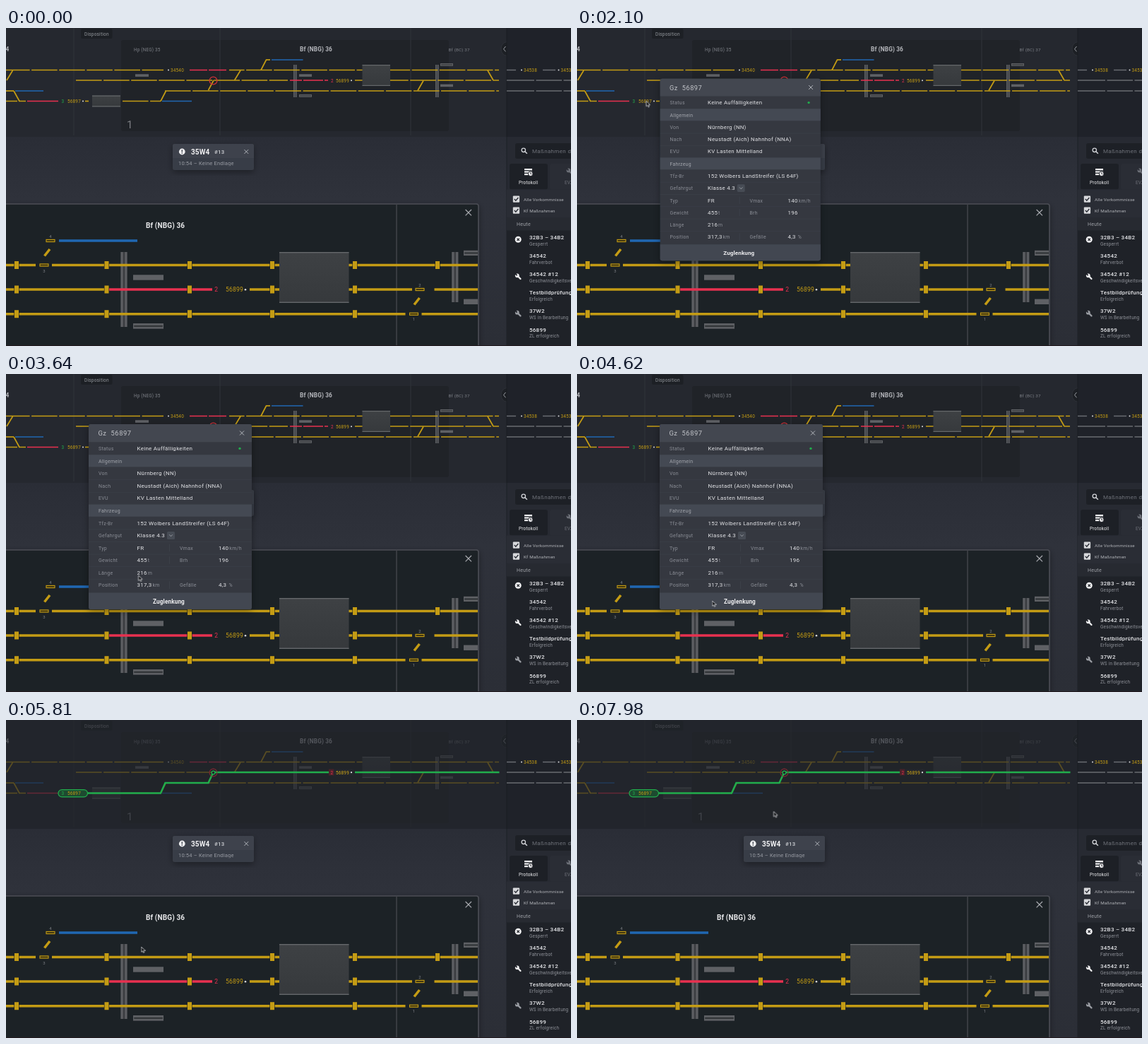
An HTML page for the animation above (8 s loop, 800 by 450 pixels).

```html
<!DOCTYPE html>
<html lang="de">
<head>
<meta charset="utf-8">
<title>Disposition</title>
<style>
html, body { margin: 0; width: 100%; height: 100%; overflow: hidden; background: #2c2f38; }
svg { display: block; width: 100vw; height: 100vh; }
text { font-family: Roboto, "Noto Sans", sans-serif; letter-spacing: .2px; white-space: pre; }
.b { font-weight: 700; letter-spacing: .13px; }
.m { font-weight: 500; letter-spacing: .25px; }
.w { letter-spacing: .35px; }
.v { letter-spacing: .27px; }
#popup { transform-origin: 160px 115px; animation: popup 8s infinite; }
#route { animation: route 8s infinite linear; }
#cursor { animation: cursor 8s infinite ease-in-out; }
@keyframes popup {
  0%, 24% { opacity: 0; transform: scale(.92); animation-timing-function: ease-out; }
  25.5% { opacity: 1; transform: scale(.974); animation-timing-function: linear; }
  26.25% { opacity: 1; transform: scale(.983); animation-timing-function: ease-out; }
  29%, 61.5% { opacity: 1; transform: scale(1); animation-timing-function: ease-in; }
  64%, 100% { opacity: 0; transform: scale(.95); }
}
@keyframes route {
  0%, 67.5% { opacity: 0; }
  71%, 100% { opacity: 1; }
}
@keyframes cursor {
  0%, 7% { transform: translate(210px, 462px); }
  15.6%, 20% { transform: translate(98px, 95px); }
  23%, 33% { transform: translate(98px, 103.5px); animation-timing-function: ease-in; }
  45.5% { transform: translate(187.5px, 285px); animation-timing-function: ease-out; }
  53%, 85.5% { transform: translate(191.5px, 321px); }
  95%, 100% { transform: translate(278.5px, 129.5px); }
}
</style>
</head>
<body>
<svg id="stage" viewBox="0 0 800 450" preserveAspectRatio="none"></svg>
<script>
const YELLOW = '#c49c14', RED = '#e8304f', BLUE = '#2067b2', GREEN = '#21ad4c';
const GREY = '#5f6165', DARK = '#1f2226', PALE = '#dcdde0', MUTED = '#8a8d95';

const rect = (x, y, w, h, fill, more = '') =>
  `<rect x="${x}" y="${y}" width="${w}" height="${h}" fill="${fill}" ${more}/>`;
const path = (d, stroke, width = 1.7, more = '') =>
  `<path d="${d}" fill="none" stroke="${stroke}" stroke-width="${width}" ${more}/>`;
const line = (x1, x2, y, stroke, width, more) => path(`M${x1} ${y}H${x2}`, stroke, width, more);
const text = (x, y, size, fill, str, cls = '', more = '') =>
  `<text x="${x}" y="${y}" font-size="${size}" fill="${fill}" class="${cls}" ${more}>${str}</text>`;
const dot = (x, y, r, fill, more = '') => `<circle cx="${x}" cy="${y}" r="${r}" fill="${fill}" ${more}/>`;
const cross = (x, y, r, stroke, width = 1.2) =>
  path(`M${x - r} ${y - r}l${2 * r} ${2 * r}m0 ${-2 * r}l${-2 * r} ${2 * r}`, stroke, width);
const group = (id, body) => `<g id="${id}">${body}</g>`;
const MID = 'text-anchor="middle"';

const defs = `<defs>
  <linearGradient id="area" x2="0" y2="1"><stop stop-color="#2a2d36"/><stop offset=".3" stop-color="#2f323b"/><stop offset="1" stop-color="#2b2e36"/></linearGradient>
  <linearGradient id="hall" x2="0" y2="1"><stop stop-color="#3e4144"/><stop offset="1" stop-color="#36393c"/></linearGradient>
  <filter id="shade" x="-20%" y="-20%" width="140%" height="140%"><feDropShadow dx="0" dy="3" stdDeviation="5" flood-opacity=".35"/></filter>
  <clipPath id="note"><rect x="236" y="183" width="115" height="12.3"/></clipPath>
  <clipPath id="pane"><rect x="0" y="250" width="668" height="200"/></clipPath>
</defs>`;

// two parallel upright beams
const beams = (x, y, w, h) =>
  rect(x, y, w, h, '#3a3c40') + rect(x, y, w * .36, h, '#5c5e62') + rect(x + w * .64, y, w * .36, h, '#5c5e62');
const hall = (x, y, w, h, edge) =>
  rect(x, y, w, h, 'url(#hall)') + rect(x, y, w, edge, '#65686b') + rect(x, y + h - edge, w, edge, '#65686b');
// hollow platform
const ledge = (x, y, w, h, e) => rect(x, y, w, h, GREY) + rect(x + e, y + h * .35, w - 2 * e, h * .32, '#34373a');

function strip() {
  const track = (x1, x2, y, shift = 0) =>
    line(x1, x2, y, YELLOW, 1.7, `stroke-dasharray="36.6 2.5" stroke-dashoffset="${shift}"`);
  const diag = d => path(d, YELLOW, 1.7);
  let s = rect(0, 0, 709, 154, '#25282f') + rect(163, 17, 464, 129, '#202328', 'rx="3"');
  for (const x of [96, 303, 573]) s += rect(x - .5, 0, 1, 152, '#31343b');
  s += rect(106, 1, 44.5, 14, '#1d2025', 'rx="2"') + text(111, 11, 6.5, '#94979d', 'Disposition');
  s += text(-.5, 33, 8.3, '#b4b6bb', '4', 'b') + text(181, 32.5, 6.4, '#7d8087', 'Hp (NEG) 35') +
    text(416, 33, 8.3, '#b4b6bb', 'Bf (NBG) 36', 'b') + text(626.5, 32.5, 6.2, '#7d8087', 'Bf (BC) 37');
  s += text(171, 142, 15, '#7c7e83', '1');

  s += rect(183, 65.3, 19, 3.6, GREY) + rect(415, 65.3, 18, 3.6, GREY) + ledge(415, 94, 18, 3.8, 1) +
    beams(407, 52, 4.6, 46) + beams(608, 52, 4.6, 46) + ledge(615, 50, 18, 3.8, 1) + rect(615, 79.6, 18, 3.6, GREY);

  s += track(0, 223, 59.5, 3) + line(260, 312, 59.5, RED, 1.7, 'stroke-dasharray="25 2"') + track(316, 698, 59.5, 15);
  s += track(99, 399, 74) + line(402, 456, 74, RED, 1.7, 'stroke-dasharray="17 2 28 2"') + track(494, 698, 74);
  s += line(0, 11, 89, YELLOW) + line(13, 53, 89, BLUE) + track(225, 698, 89);
  s += line(0, 28, 103.5, YELLOW, 1.7, 'stroke-dasharray="16 2"') + line(30, 74, 103.5, RED) +
    line(112, 117, 103.5, YELLOW) + track(165, 219, 103.5) + line(221, 263, 103.5, BLUE);
  s += line(368, 374, 45, YELLOW) + line(376, 420.5, 45, BLUE);
  s += diag('M1 74L9.5 60M11 89L19 103.5M219 103.5L226.5 89M286.5 88L294 74M323.5 74L332 60M361 59.5L368.5 45M583 88.5L591 74.5M682 60L690 74');
  s += hall(122, 95.5, 40, 16, 1.2) + hall(504.5, 52, 39.5, 30, 1.2);
  s += dot(293.5, 74.5, 5.4, 'none', `stroke="#cf3039" stroke-width="1.3"`);

  s += dot(230, 59.5, 1, PALE) + text(233, 62, 6.4, YELLOW, '34540');
  s += text(460, 76.5, 6.4, RED, '2') + text(467, 76.5, 6.4, YELLOW, '56899') + dot(489, 74.2, 1, PALE);
  s += text(78.5, 106, 6.4, GREEN, '3') + text(87, 106, 6.4, YELLOW, '56897') + dot(109, 103.6, 1, PALE);
  s += path('M709 19.5q-8 2 -8 10t8 10', '#31343b', .8, 'style="fill:#1d2025"') + path('M707.5 26l-3 3.7l3 3.7', '#9a9da3', 1);
  return s;
}

function route() {
  return rect(0, 0, 709, 154, '#22252b', 'fill-opacity=".66"') +
    path('M115 103.5H219L225.5 89H286.5L292.5 76M296 74H457M494 74H698.5', GREEN, 2.5) +
    dot(293.5, 74.5, 5.4, 'none', 'stroke="#7d2a33" stroke-width="1"') +
    dot(293.5, 74.5, 2.4, '#22252b', `stroke="${GREEN}" stroke-width="1.3"`) +
    rect(74, 98.7, 41.5, 10.2, '#1d4a30', `rx="5.1" stroke="${GREEN}" stroke-width="1.2"`) +
    text(78.5, 106, 6.4, GREEN, '3') + text(87, 106, 6.4, YELLOW, '56897') +
    rect(457, 69.5, 7.5, 9, '#4a2229') + rect(464.5, 69.5, 28, 9, '#24272c') +
    text(459.5, 76.5, 6.4, RED, '2') + text(467, 76.5, 6.4, '#d0a615', '56899') + dot(489, 74.2, 1.1, PALE);
}

function corner() {
  let s = rect(709, 0, 91, 154, '#1f2229') + rect(708.5, 0, 1, 154, '#1a1c22');
  const rail = (a, b, y) => line(a, b, y, '#686b71', 1.5);
  s += rail(709, 722, 59.5) + rail(760, 778, 59.5);
  for (const y of [74, 89]) s += rail(709, 748, y) + rail(750.5, 787, y) + rail(789.5, 800, y);
  s += dot(730, 59.5, 1, PALE) + text(733, 62, 6.4, YELLOW, '34538');
  return s + dot(782.5, 59.5, 1, PALE) + text(785.5, 62, 6.4, YELLOW, '34536');
}

function toast() {
  return `<g filter="url(#shade)">${rect(236, 164, 115, 37, '#393d46', 'rx="3"')}</g>` +
    path('M236 184V167q0 -3 3 -3H348q3 0 3 3V184z', 'none', 0, 'style="fill:#3e424c"') +
    dot(249.3, 175, 4.4, '#f0f0f2') + rect(248.6, 172.3, 1.4, 3.2, '#3e424c') + rect(248.6, 176.4, 1.4, 1.4, '#3e424c') +
    text(262, 178.6, 10, '#f0f0f2', '35W4', 'b') + text(295, 178.4, 7.8, '#d0d2d6', '#13', 'm') +
    cross(340.3, 175, 2.9, '#aeb1b7', 1) +
    text(244, 194.3, 7.5, '#989ba3', '10:54 – Keine Endlage', '', 'clip-path="url(#note)"');
}

function pane() {
  const bar = (a, b, y, c = YELLOW) => line(a, b, y, c, 3.4);
  const point = (x, y) => rect(x, y - 1.6, 12, 3.2, '#3f3510', `stroke="${YELLOW}" stroke-width="1.1"`);
  const num = (x, y, n) => text(x, y, 6, '#7e8086', n, '', MID);
  let s = `<g filter="url(#shade)">${rect(-4, 249, 673, 206, DARK, 'rx="3" stroke="#4b4e55" stroke-width="1.6"')}</g>`;
  s += rect(552.4, 250, 1.2, 200, '#4a4d52');
  s += text(198, 283, 10, '#e6e7e9', 'Bf (NBG) 36', 'b') + cross(654.8, 261.2, 4.2, '#a9abb0', 1.2);

  let p = beams(162.5, 317, 9, 106) + beams(631.3, 317, 9, 71);
  p += rect(180, 349.3, 43, 7.4, GREY) + ledge(180, 418, 43, 7.6, 1.2) +
    ledge(648, 314.8, 22, 7.2, 1.2) + rect(648, 383.6, 22, 7.4, GREY);
  p += bar(0, 42, 335.5) + bar(65, 668, 335.5);
  p += bar(0, 142, 370) + bar(146, 292, 370, RED) + bar(345, 575, 370) + bar(606.5, 668, 370);
  p += bar(0, 565.5, 404.7) + bar(588.5, 668, 404.7) + bar(75, 186, 301, BLUE);
  for (const [y, n] of [[335.5, 6], [370, 5], [404.7, 5]])
    for (const x of [15, 142.5, 260, 377, 494, 611].slice(0, n))
      p += rect(x - 3.6, y - 5.6, 7.2, 11.2, DARK) + rect(x - 3, y - 5.5, 6, 11, YELLOW);
  p += point(48, 335.5) + point(57, 301) + point(580, 370) + point(571.5, 404.7);
  p += path('M54.5 322.5L62 313M578 391.5L585.5 382', YELLOW, 3.6);
  p += num(63, 296.5, 4) + num(54, 345.5, 3) + num(586, 365.5, 2) + num(577.5, 414, 1);
  p += hall(387, 317, 98.5, 72, 1.4);
  p += text(295.3, 373.2, 8.5, RED, '2') + text(311, 373.2, 8.6, YELLOW, '56899') + dot(339, 370.2, 1.3, PALE);
  return s + `<g clip-path="url(#pane)">${p}</g>`;
}

function wrench(x, y, fill, back) {
  return `<g transform="translate(${x} ${y})">` + dot(-1.5, -1.5, 2.9, fill) +
    path('M-1 -1L3.2 3.2', fill, 2.2, 'stroke-linecap="round"') + path('M-1.7 -1.7L-5 -5', back, 1.9) + '</g>';
}

function sidebar() {
  let s = rect(709, 154, 91, 296, '#272a32') + rect(708.5, 154, 1, 296, '#1d2026');
  s += rect(721, 163, 90, 22, '#1d2026', 'rx="3"') +
    dot(732.8, 172.8, 2.7, 'none', 'stroke="#d0d2d6" stroke-width="1.3"') + path('M734.8 174.8l3 3', '#d0d2d6', 1.6) +
    text(745, 177.2, 8, '#6f727a', 'Maßnahmen durchsuchen', 'w');
  s += rect(713, 192, 54, 36.5, '#1d2026', 'rx="3"') + rect(770, 192, 40, 36.5, '#2a2d35', 'rx="3"');
  for (let i = 0; i < 3; i++) s += rect(734, 199 + i * 3.5, i > 1 ? 5 : 11, 2.2, '#f0f0f2');
  s += dot(742.7, 206.3, 3.3, '#f0f0f2', 'stroke="#1d2026" stroke-width=".9"') + path('M742.7 204.3v2.2h1.7', '#1d2026', .8);
  s += text(739.7, 221, 6.4, '#f0f0f2', 'Protokoll', '', MID);
  s += wrench(798, 203, '#6d7078', '#2a2d35') + text(791, 221, 6.4, '#6d7078', 'EVZS');
  s += rect(709, 228.5, 91, 40, '#2a2d35') + rect(709, 268.5, 91, 18, '#272a31') + rect(709, 286.5, 91, 164, '#1f2228');
  [['Alle Vorkommnisse', 242], ['Kf Maßnahmen', 258]].forEach(([label, y]) => {
    s += rect(717.8, y - 4.6, 9.3, 9.3, '#d8d9dc', 'rx="1"') + path(`M719.8 ${y}l2 2.2l3.6 -4.2`, '#272a32', 1.3) +
      text(733, y + 2.6, 6.2, '#b3b5ba', label);
  });
  s += text(723, 279.6, 7, '#a0a3a9', 'Heute', 'v');
  [['32B3 – 34B2', 'Gesperrt'], ['34542', 'Fahrverbot'], ['34542 #12', 'Geschwindigkeitsverstoß'],
   ['Testbildprüfung', 'Erfolgreich'], ['37W2', 'WS in Bearbeitung'], ['56899', 'ZL erfolgreich'],
   ['34B2 – 35B1', 'Gesperrt']].forEach(([head, sub], i) => {
    const y = 298.8 + i * 26.15;
    s += text(741, y, 8, '#e4e5e8', head, 'm') + text(741, y + 8.7, 6.4, '#8f9299', sub);
  });
  s += dot(725.2, 299.3, 4.5, '#f0f0f2') + cross(725.2, 299.3, 1.7, '#1f2228', 1.2);
  return s + wrench(725.3, 351.8, '#f0f0f2', '#1f2228') + wrench(725.3, 404.2, '#9a9da3', '#1f2228');
}

function popup() {
  const rowY = i => 108.2 + i * 17.57;
  const label = (x, i, str) => text(x, rowY(i), 7, MUTED, str, 'v');
  const value = (x, i, str, unit = '') =>
    text(x, rowY(i), 8, '#e2e3e6', unit ? `${str}<tspan font-size="7" fill="${MUTED}" dx="1">${unit}</tspan>` : str, 'v');
  let s = `<g filter="url(#shade)">${rect(117, 71, 231, 262, '#343840', 'rx="3"')}</g>`;
  s += path('M117 96.3V74q0 -3 3 -3H345q3 0 3 3V96.3z', 'none', 0, 'style="fill:#434750"') +
    path('M117 309.5H348V330q0 3 -3 3H120q-3 0 -3 -3z', 'none', 0, 'style="fill:#424751"');
  s += text(130.5, 87.2, 9.4, '#c3c5ca', 'Gz', 'w') +
    text(148.5, 87.2, 9.4, '#c3c5ca', '56897', '', 'style="letter-spacing:.55px"') + cross(334, 83.5, 3, '#b4b7bd', 1);
  for (const i of [2, 3, 6, 7, 8, 9, 10]) s += rect(117, rowY(i) + 6, 231, .7, '#3b3f48');
  for (const i of [1, 5]) s += rect(117, rowY(i) - 11.5, 231, 17.2, '#444953');
  for (const i of [8, 9, 11]) s += rect(231, rowY(i) - 8, .7, 10.5, '#40444d');
  ['Status', 'Allgemein', 'Von', 'Nach', 'EVU', 'Fahrzeug', 'Tfz-Br', 'Gefahrgut', 'Typ', 'Gewicht', 'Länge', 'Position']
    .forEach((str, i) => s += i % 4 === 1 && i < 6
      ? text(131, rowY(i), 7, '#a3a6ad', str, 'v') : label(131, i, str));
  s += value(185.5, 0, 'Keine Auffälligkeiten') + dot(331, 105.4, 1.7, GREEN) +
    value(185.5, 2, 'Nürnberg (NN)') + value(185.5, 3, 'Neustadt (Aich) Nahnhof (NNA)') +
    value(185.5, 4, 'KV Lasten Mittelland') + value(185.5, 6, '152 Wolbers LandStreifer (LS 64F)') +
    value(185.5, 7, 'Klasse 4.3') + value(185.5, 8, 'FR') + value(185.5, 9, '455', 't') +
    value(185.5, 10, '216', 'm') + value(185.5, 11, '317,3', 'km');
  s += label(246, 8, 'Vmax') + label(246, 9, 'Brh') + label(246, 11, 'Gefälle') +
    value(301, 8, '140', 'km/h') + value(301, 9, '196') + value(301, 11, '4,3', ' %');
  s += rect(228, 223, 11, 11, '#474c55', 'rx="1.5"') + path('M231.3 227.4l2.2 2.3l2.2 -2.3', '#a3a6ad', .9);
  return s + text(230.5, 324.8, 8.2, '#f0f0f2', 'Zuglenkung', 'b', MID);
}

const pointer = '<path d="M0 0V7.4L1.8 5.8L3 8.4L4.4 7.8L3.2 5.3L5.6 5.2Z" fill="#15171a" stroke="#d9dadd" stroke-width=".8" stroke-linejoin="round"/>';

document.getElementById('stage').innerHTML = defs + rect(0, 154, 709, 296, 'url(#area)') +
  strip() + group('route', route()) + corner() + toast() + pane() + sidebar() +
  rect(0, 449, 800, 1, '#231a1f') + group('popup', popup()) + group('cursor', pointer);
</script>
</body>
</html>
```
